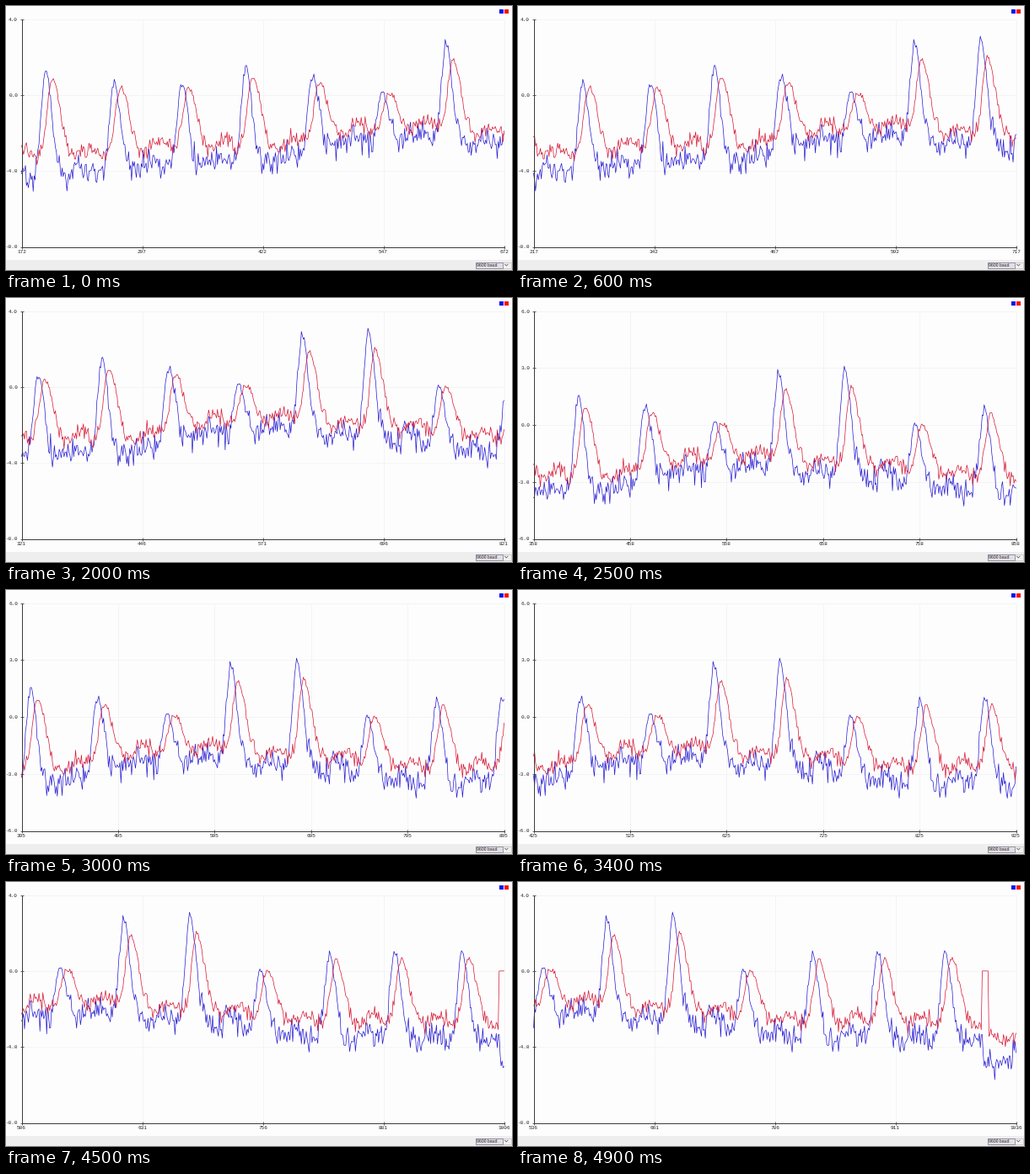
A matplotlib script that plays this animation: 600x314 px, repeating every 5 s.

```python
import matplotlib.pyplot as plt
import numpy as np
from matplotlib.animation import FuncAnimation
from matplotlib.collections import LineCollection
from matplotlib.patches import Rectangle

W, H, DPI = 600, 314, 100
PX = 72 / DPI                      # one pixel in points
LEFT, RIGHT, TOP, BOTTOM = 18.5, 590.5, 15.5, 286.5
FIRST, LAST, WINDOW = 172, 1036, 500
FRAMES, INTERVAL = 50, 100
RESTART, WARM_UP = 1001, 7         # sample where the sensor restarts
BLUE, RED = "#2218d0", "#d41430"

# Sample and height of each pulse
PULSES = [(197, 1.35), (268, 0.7), (338, 0.6), (404.5, 1.45), (473.5, 1.0),
          (546, 0.1), (612, 2.75), (680.5, 2.9), (753.5, 0.1), (825, 0.85),
          (892.5, 0.95), (962.5, 1.0)]
# Resting level of the raw signal as it drifts
DRIFT = [(172, -4.3), (250, -4.0), (330, -3.5), (440, -3.5), (500, -2.4),
         (600, -2.1), (650, -2.6), (720, -2.7), (800, -3.4), (1000, -3.5),
         (1003, -5.0), (1036, -4.4)]


def make_trace(rest_gain, peak_gain, delay, rise, fall, noise):
    """Drifting floor with a ripple, lopsided bell pulses and jitter."""
    floor = rest_gain * np.interp(samples, *np.array(DRIFT).T)
    trace = floor.copy()
    quiet = np.ones(samples.size)
    for centre, height in PULSES:
        d = samples - centre - delay
        bell = np.exp(-(d / np.where(d < 0, rise, fall)) ** 2)
        trace += bell * (peak_gain * height - floor)
        quiet -= bell
    phase = (samples - PULSES[0][0] - delay) / 69.6
    trace += 0.25 * quiet * np.cos(4 * np.pi * (phase - 0.57))
    jitter = np.clip(rng.normal(size=samples.size), -2.2, 2.2)
    return trace + noise * (0.35 + 0.65 * quiet) * jitter


samples = np.arange(FIRST, LAST + 1)
rng = np.random.default_rng(12)
raw = make_trace(1, 1, 0, 6.5, 8.5, 0.36)
smooth = make_trace(0.75, 0.67, 7, 7.5, 10.5, 0.22)
smooth[(samples >= RESTART) & (samples < RESTART + WARM_UP)] = 0

fig = plt.figure(figsize=(W / DPI, H / DPI), dpi=DPI, facecolor="#fefdfe")
ax = fig.add_axes([0, 0, 1, 1])
ax.set(xlim=(0, W), ylim=(H, 0))
ax.axis("off")


def box(x, y, w, h, color, edge="none"):
    ax.add_patch(Rectangle((x, y), w, h, facecolor=color, edgecolor=edge,
                           linewidth=0.7 * PX, zorder=5))


def line(xs, ys, color="#3c3c3c", width=1.0, z=4):
    return ax.plot(xs, ys, color=color, lw=width * PX, zorder=z)[0]


def segments(color, width, z):
    return ax.add_collection(LineCollection([], colors=color, zorder=z,
                                            linewidths=width * PX))


def label(x, y, ha):
    return ax.text(x, y, "", ha=ha, va="center_baseline", fontsize=6 * PX,
                   family="Liberation Mono", color="#222222", zorder=6)


grid = segments("#f4f4f4", 1, 1)
ticks = segments("#3c3c3c", 0.8, 4)
raw_line = line([], [], BLUE, 0.7, 2)
smooth_line = line([], [], RED, 0.7, 3)
line([LEFT, LEFT], [TOP, BOTTOM])
line([LEFT, RIGHT], [BOTTOM, BOTTOM])
x_labels = [label(0, 292, "center") for _ in range(6)]
y_labels = [label(14, 0, "right") for _ in range(5)]

# Legend, pointer edge and the bottom bar with its speed selector
box(585, 4, 5, 5, "#0808f0")
box(590.5, 4, 5, 5, "#f80c0c")
line([599.5, 599.5], [81, 87], "#999999")
box(0, 302, W, 12, "#eeeeee")
box(556.5, 304.5, 42, 7.5, "#f0f0f0", "#c4c4c4")
box(556.5, 304.5, 32, 7.5, "#e2dee6", "#7c7284")
ax.text(558, 308.1, "9600 baud", fontsize=5.1 * PX, va="center", ha="left",
        family="Liberation Sans", color="#222222", zorder=6)
line([591.5, 593.3, 595.1], [307.2, 309, 307.2], "#666666", 0.8, 6)


def first_sample(frame):
    return round(FIRST + (LAST - WINDOW - FIRST) * frame / (FRAMES - 1))


def update(frame):
    start = first_sample(frame)
    wide = 21 <= frame < 42
    high, step, rows, cols = (6, 3, 4, 5) if wide else (4, 4, 3, 4)
    unit = (BOTTOM - TOP) / 12

    view = slice(start - FIRST, start - FIRST + WINDOW + 1)
    xs = np.linspace(LEFT, RIGHT, WINDOW + 1)
    raw_line.set_data(xs, TOP + (high - raw[view]) * unit)
    smooth_line.set_data(xs, TOP + (high - smooth[view]) * unit)

    tick_x = np.linspace(LEFT, RIGHT, cols + 1)
    tick_y = np.linspace(TOP, BOTTOM, rows + 1)
    grid.set_segments([[(x, TOP), (x, BOTTOM)] for x in tick_x]
                      + [[(LEFT, y), (RIGHT, y)] for y in tick_y])
    ticks.set_segments([[(x, 284.5), (x, 288.5)] for x in tick_x]
                       + [[(16.5, y), (20.5, y)] for y in tick_y])
    for i, text in enumerate(x_labels):
        text.set_visible(i <= cols)
        if i <= cols:
            text.set_x(tick_x[i])
            text.set_text(str(start + i * WINDOW // cols))
    for i, text in enumerate(y_labels):
        text.set_visible(i <= rows)
        if i <= rows:
            text.set_y(tick_y[i])
            text.set_text(f"{high - i * step:.1f}")
    return []


anim = FuncAnimation(fig, update, frames=FRAMES, interval=INTERVAL,
                     repeat=True, repeat_delay=0, blit=False)
plt.show()
```
